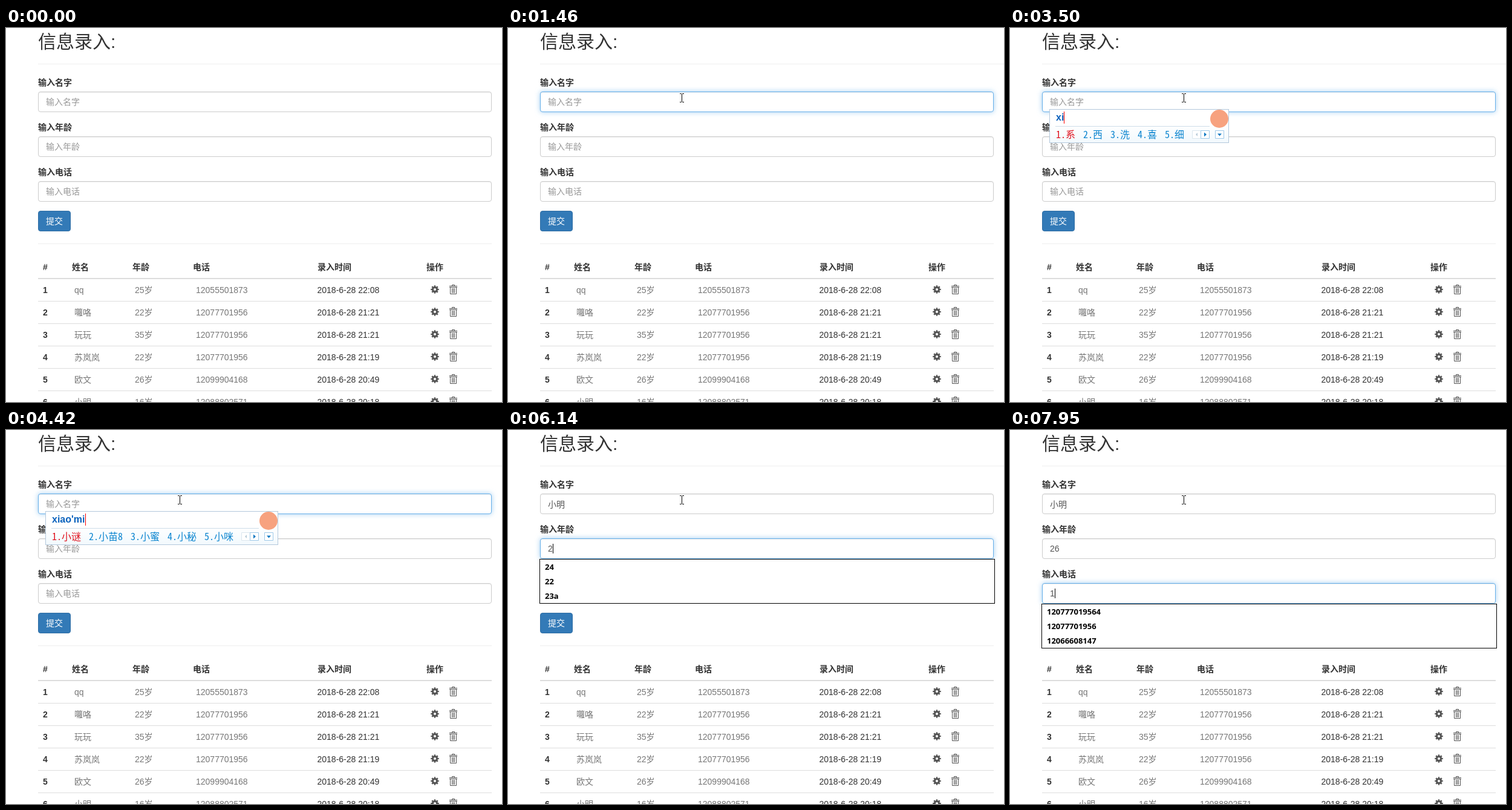
These frames come from a looping animation (820x618 px, 8 s). An HTML page:

```html
<!DOCTYPE html>
<html lang="zh-CN">
<head>
<meta charset="utf-8">
<title>信息录入</title>
<style>
* { box-sizing: border-box; }
html, body { margin: 0; width: 100%; height: 100%; overflow: hidden; background: #fff; }
body { position: relative; color: #333; font: 14px/20px "Liberation Sans", "Noto Sans CJK SC", "Noto Sans CJK", sans-serif; }
.a, .field, .list, #ime, #ime * , svg { position: absolute; white-space: nowrap; }
.bold { font-weight: 700; }
.gray { color: #777; }
.title { font-size: 30px; line-height: 33px; }
.field { left: 53px; width: 750px; height: 34px; padding: 6px 12px; border: 1px solid; border-radius: 4px; background: #fff; color: #555; }
.field span { position: relative; }
.field i { display: inline-block; width: 1px; height: 16px; margin-right: -1px; vertical-align: -3px; background: #000; position: relative; z-index: 1; }
.field .hint { color: #999; }
.btn { left: 53px; top: 302px; width: 54px; height: 34px; padding: 6px 12px; border: 1px solid #2e6da4; border-radius: 4px; background: #337ab7; color: #fff; }
.list { left: 52px; width: 753px; padding-left: 8px; border: 1px solid #000; background: #fff; color: #000; font: 700 13px/24px "Open Sans", sans-serif; }
#ime { left: 65px; top: 134px; height: 56px; border: 1px solid #b3c8dc; background: linear-gradient(#fff 45%, #f2f9fd); }
#ime .typed { left: 10px; top: 3px; font-weight: 700; font-size: 16px; color: #0a62bd; border-right: 1px solid #f00; }
#ime .rule { left: 9px; right: 31px; top: 27px; height: 1px; background: #cfdde8; }
#ime .logo { right: 0; top: 0; width: 30px; height: 30px; border-radius: 50%; background: #f7a27f; }
#ime .word { top: 30px; color: #0a84cf; font: 300 16px/20px "Noto Sans Mono CJK SC", "Noto Sans CJK SC", monospace; }
#ime .word.first { color: #e0101c; }
#ime svg { right: -1px; top: 33px; }
</style>
</head>
<body>
<script>
const add = (html) => document.body.insertAdjacentHTML('beforeend', html);
const text = (x, y, s, cls = '') => add(`<div class="a ${cls}" style="left:${x}px;top:${y}px">${s}</div>`);
const line = (x, y, w, h, c) => add(`<div class="a" style="left:${x}px;top:${y}px;width:${w}px;height:${h}px;background:${c}"></div>`);

// Form
text(53, 6, '信息录入:', 'title');
line(53, 59, 767, 1, '#eee');
const fields = ['名字', '年龄', '电话'].map((name, i) => {
  const y = 105 + 74 * i;
  text(53, y - 25, '输入' + name, 'bold');
  add(`<div class="field" style="top:${y}px"><span></span><i></i><span class="hint">输入${name}</span></div>`);
  const box = document.body.lastElementChild;
  const [value, caret, hint] = box.children;
  return { box, value, caret, hint };
});
text(53, 302, '提交', 'btn');
line(53, 356, 750, 1, '#eee');

// Table
[[61, '#'], [109, '姓名'], [209, '年龄'], [309, '电话'], [515, '录入时间'], [695, '操作']]
  .forEach(([x, s]) => text(x, 385, s, 'bold'));
line(53, 413, 750, 2, '#ddd');
const gear = `<g fill="none" stroke="#555"><circle cx="7" cy="8" r="3.6" stroke-width="3.2"/>
  <circle cx="7" cy="8" r="5.7" stroke-width="2.2" pathLength="16" stroke-dasharray="1 1" stroke-dashoffset=".5"/></g>`;
const bin = `<path d="M35.5 2.5v-2h4v2M31 2.5h13M31 4.5h13M32.5 4v11.5h10V4M35.5 6v8M37.5 6v8M39.5 6v8" fill="none" stroke="#555"/>`;
[
  ['qq', 25, '12055501873', '22:08'],
  ['囖咯', 22, '12077701956', '21:21'],
  ['玩玩', 35, '12077701956', '21:21'],
  ['苏岚岚', 22, '12077701956', '21:19'],
  ['欧文', 26, '12099904168', '20:49'],
  ['小明', 16, '12088802571', '20:18'],
].forEach(([name, age, phone, time], i) => {
  const y = 423 + 37 * i;
  text(61, y, i + 1, 'bold');
  text(113, y, name, 'gray');
  text(213, y, age + '岁', 'gray');
  text(314, y, phone, 'gray');
  text(514.5, y, '2018-6-28 ' + time);
  add(`<svg style="left:702px;top:${y + 1}px" width="46" height="17">${gear}${bin}</svg>`);
  line(53, y + 28, 750, 1, '#ddd');
});

// Overlays
add(`<div class="list"></div><div id="ime"></div>
<svg id="beam" width="9" height="17"><path d="M1 1.5h2.5l1 1 1-1H8M4.5 2v13M1 15.5h2.5l1-1 1 1H8" fill="none" stroke="#000"/></svg>
<svg id="arrow" width="13" height="20"><path d="M.5.5v16l3.7-3.6 2.4 5.6 2.3-1-2.4-5.5h5z" fill="#fff" stroke="#000"/></svg>`);
const $ = (q) => document.querySelector(q);
const list = $('.list'), ime = $('#ime'), beam = $('#beam'), arrow = $('#arrow');

// Timelines: [start ms, value]
const values = [
  [[0, ''], [2240, 'x'], [2630, ''], [4890, '小明']],
  [[0, ''], [6140, '2'], [6690, '26']],
  [[0, ''], [7950, '1']],
];
const carets = [[0, -1], [910, 0], [1460, -1], [2010, 0], [3040, -1], [4890, 0], [5050, 1],
  [5590, -1], [6140, 1], [7010, 2], [7570, -1], [7950, 2]];
const focus = [[920, 5050], [5050, 7010], [7010, 9000]];
const lists = [
  [0, null],
  [2390, [0, 'x', 'xx', 'xm', 'xia', 'xiao', 'xin']], [2630, null],
  [6140, [1, '24', '22', '23a']], [6690, null],
  [7950, [2, '120777019564', '12077701956', '12066608147']],
];
const typing = [
  [0, null],
  [3040, ['x', '想 下 小 先 像']],
  [3330, ['xi', '系 西 洗 喜 细']],
  [3610, ['xia', '下 夏 吓 瞎 虾']],
  [3890, ['xiao', '小 笑 校 效 晓']],
  [4190, ["xiao'm", '小明 小妹 小猫 小名 小美']],
  [4420, ["xiao'mi", '小谜 小苗8 小蜜 小秘 小咪']],
  [4590, ["xiao'min", '小民 小敏 晓敏 小闽 晓民']],
  [4730, ["xiao'ming", '小明 小名 小命 小鸣 晓明']],
  [4890, null],
];
const at = (track, t) => track.findLast(([start]) => start <= t)[1];
const clamp = (v) => Math.min(1, Math.max(0, v));
const fade = (t, start) => clamp(Math.floor((t - start) / 80) / 2);
const mix = (a, b, p) => a + (b - a) * p;
const show = (el, on) => { el.style.display = on ? '' : 'none'; };
const fill = (el, html) => { if (el.html !== html) el.innerHTML = el.html = html; };

function drawFields(t) {
  const active = at(carets, t);
  fields.forEach(({ box, value, caret, hint }, i) => {
    const s = at(values[i], t), p = fade(t, focus[i][0]) - fade(t, focus[i][1]);
    value.textContent = s;
    value.style.top = s === '小明' ? '1px' : 0;
    show(hint, !s);
    show(caret, active === i);
    box.style.borderColor = `rgb(${mix(204, 102, p)},${mix(204, 175, p)},${mix(204, 233, p)})`;
    box.style.boxShadow = `inset 0 1px 1px rgba(0,0,0,.075), 0 0 ${8 * p}px rgba(102,175,233,${0.6 * p})`;
  });
}

function drawList(t) {
  const items = at(lists, t);
  show(list, items);
  if (!items) return;
  list.style.top = 139 + 74 * items[0] + 'px';
  fill(list, items.slice(1).map((s) => `<div>${s}</div>`).join(''));
}

function drawIme(t) {
  const state = at(typing, t);
  show(ime, state);
  if (!state) return;
  let x = 10;
  const words = state[1].split(' ').map((w, i) => {
    const html = `<div class="word ${i ? '' : 'first'}" style="left:${x}px">${i + 1}.${w}</div>`;
    x += 29 + [...w].reduce((sum, c) => sum + (c < '~' ? 8 : 16), 0);
    return html;
  });
  ime.style.width = x - 13 + 75 + 'px';
  fill(ime, `<div class="typed">${state[0]}</div><div class="rule"></div><div class="logo"></div>${words.join('')}
    <svg width="61" height="16"><g fill="#fff"><path d="M.5 1.5h14v13H.5z" stroke="#dbe6ee"/>
    <path d="M14.5 1.5h14v13h-14zM38.5 1.5h14v13h-14z" stroke="#9fc9e8"/></g>
    <path d="M9 5v6L6 8z" fill="#b8cbd8"/><path d="M20 4.500v7l4-3.500zM42 6.500h7l-3.500 4z" fill="#0a78c2"/></svg>`);
}

function drawPointer(t) {
  const step = Math.floor((t - 130) / 75) * 75;
  const p = clamp(step / 675), e = p * p * (3 - 2 * p);
  const x = mix(345, 287, e), y = mix(590, 115, e);
  const inField = [0, 1, 2].some((i) => y > 105 + 74 * i && y < 139 + 74 * i);
  show(beam, t >= 130 && inField);
  show(arrow, t >= 130 && !inField);
  beam.style.left = Math.round(x) - 4 + 'px';
  beam.style.top = Math.round(y) - 8 + 'px';
  arrow.style.left = Math.round(x) + 'px';
  arrow.style.top = Math.round(y) + 'px';
}

function frame() {
  const t = performance.now() % 8000;
  drawFields(t);
  drawList(t);
  drawIme(t);
  drawPointer(t);
  requestAnimationFrame(frame);
}
frame();
</script>
</body>
</html>
```
